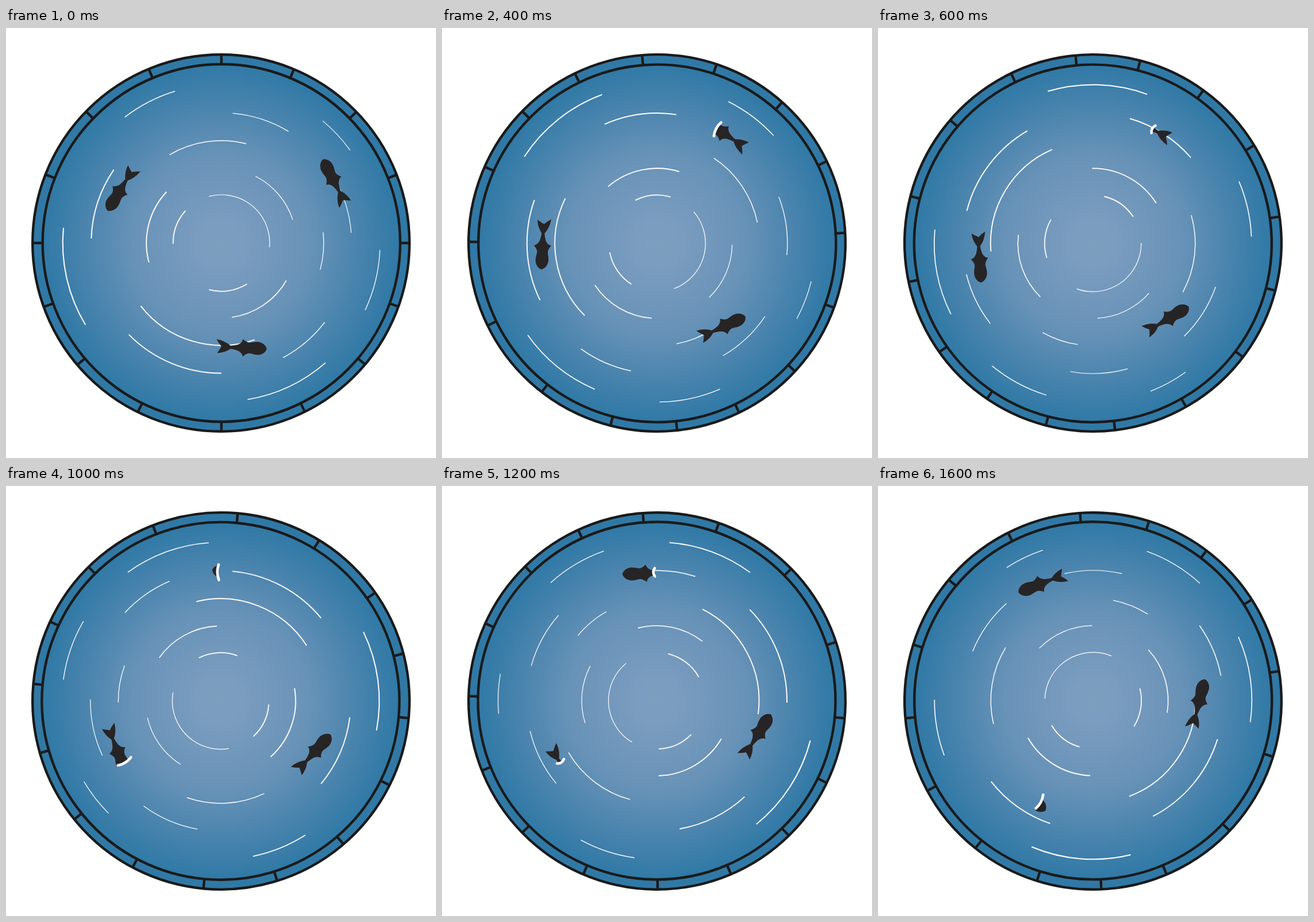
Recreate the animation shown at these times as an HTML page with a canvas. Size 748 px wide and 748 px high, loop 1.8 s.

```html
<!DOCTYPE html>
<html lang="en">
<head>
<meta charset="utf-8">
<title>Fish tank</title>
<style>
  html, body { margin: 0; height: 100%; overflow: hidden; background: #fff; }
  canvas { display: block; width: 748px; height: 748px; }
</style>
</head>
<body>
<canvas id="stage" width="748" height="748"></canvas>
<script>
const ctx = document.getElementById('stage').getContext('2d');
const SIZE = 748, MID = SIZE / 2, STEP = 200, STEPS = 9;
const INK = '#1a1a1a', WALL = '#3079a6';
const rad = deg => deg * Math.PI / 180;
const sin = deg => Math.sin(rad(deg)), cos = deg => Math.cos(rad(deg));
const clamp = (v, lo, hi) => Math.min(hi, Math.max(lo, v));

// Degrees the school has swum at each step
const swum = [0, 13.2, 28.5, 35, 41.5, 52.5, 63.5, 73, 82];

const school = [
  { radius: 225, start: -29, lean: -88, pace: 1.03 },
  { radius: 199, start: 208.5, lean: -87, pace: 1.01 },
  { radius: 184, start: 78.5, lean: -76, pace: .95 }
];

// Fish are hidden between the two angles of each tunnel
const tunnels = [[-91, -62], [118, 148]];

// Ripple arcs per ring, from the inside out: [start, end] in degrees
const rings = [
  [[-105, 5], [58, 105], [179, 222]],
  [[-63, -18], [30, 82], [165, 223]],
  [[-120.5, -76], [-6, 15], [71, 142]],
  [[-85, -59], [-30, -4.5], [37.5, 61.7], [90, 135.3], [182, 214.3]],
  [[-127.5, -107], [-50.3, -35.8], [2.5, 25], [49, 80.5], [149, 185.5]]
];

const fishShape = new Path2D(
  'M43 0C41 7 34 11 27 11C20 11 17 9 12 9Q7 10 2 15Q0 8 -8 5Q-15 3 -20 2.5Q-30 10 -43 11' +
  'Q-39 5 -36 -1Q-41 -6 -45 -13Q-30 -11 -20 -2.5Q-14 -3 -8 -5Q0 -8 1 -15Q7 -10 12 -9.5' +
  'C18 -10 20 -11.5 27 -11.5C34 -11 41 -7 43 0Z');

const openWater = new Path2D(`M0 0H${SIZE}V${SIZE}H0Z`);
for (const [from, to] of tunnels) {
  openWater.moveTo(MID, MID);
  openWater.arc(MID, MID, 300, rad(from), rad(to));
  openWater.closePath();
}

const water = ctx.createRadialGradient(0, 0, 0, 0, 0, 311);
[[0, '#7c9fbe'], [.11, '#7b9dc0'], [.5, '#6892b7'], [.8, '#4682ac'], [1, WALL]]
  .forEach(stop => water.addColorStop(...stop));

// Runs fn in a frame moved to (x, y) and turned by the angle
function placed(x, y, angle, fn) {
  ctx.save();
  ctx.translate(x, y);
  ctx.rotate(rad(angle));
  fn();
  ctx.restore();
}

function disc(r, fill) {
  ctx.beginPath();
  ctx.arc(0, 0, r, 0, rad(360));
  ctx.fillStyle = fill;
  ctx.fill();
  ctx.stroke();
}

function drawTank() {
  ctx.strokeStyle = INK;
  ctx.lineWidth = 4.4;
  disc(327.8, WALL);
  ctx.translate(.7, 0);
  disc(311, water);
  ctx.beginPath();
  for (let even = 0; even < 360; even += 22.5) {
    const angle = even - 2.8 * sin(2 * even) * (1 + sin(even));
    ctx.moveTo(312 * cos(angle), 312 * sin(angle));
    ctx.lineTo(327 * cos(angle), 327 * sin(angle));
  }
  ctx.stroke();

  ctx.strokeStyle = '#fff';
  rings.forEach((arcs, i) => {
    for (const [from, to] of arcs) {
      ctx.lineWidth = 1.6 - .4 * cos((from + to) / 2 + 30);
      ctx.beginPath();
      ctx.arc(0, 0, 84 + 46 * i + i * i / 2, rad(from), rad(to));
      ctx.stroke();
    }
  });
}

function drawFish({ radius, lean }, angle) {
  ctx.save();
  ctx.clip(openWater, 'evenodd');
  ctx.fillStyle = '#272425';
  placed(MID + radius * cos(angle), MID + 2 + radius * sin(angle), angle + lean,
    () => ctx.fill(fishShape));
  ctx.restore();
}

// A white slit where a fish crosses a tunnel mouth, shortest at its thin tail
function drawSlit({ radius }, angle, mouth) {
  const along = rad(angle - mouth) * radius;
  if (Math.abs(along) > 43) return;
  const half = Math.min(13.5, 7 + Math.abs(along + 13) / 4);
  placed(MID, MID, mouth, () => {
    ctx.strokeStyle = '#fff';
    ctx.lineWidth = 4.5;
    ctx.lineCap = 'round';
    ctx.beginPath();
    ctx.moveTo(radius - 1 - half, 0);
    ctx.quadraticCurveTo(radius - 1, -5, radius - 1 + half, 0);
    ctx.stroke();
  });
}

function draw(now) {
  const step = Math.floor(now / STEP) % STEPS;
  const spin = 40.35 * clamp(step - .41, 0, 7.12);
  ctx.clearRect(0, 0, SIZE, SIZE);
  placed(MID, MID, spin, drawTank);
  for (const fish of school) {
    const angle = fish.start - swum[step] * fish.pace;
    drawFish(fish, angle);
    for (const mouth of tunnels.flat()) drawSlit(fish, angle, mouth);
  }
  requestAnimationFrame(draw);
}
requestAnimationFrame(draw);
</script>
</body>
</html>
```
